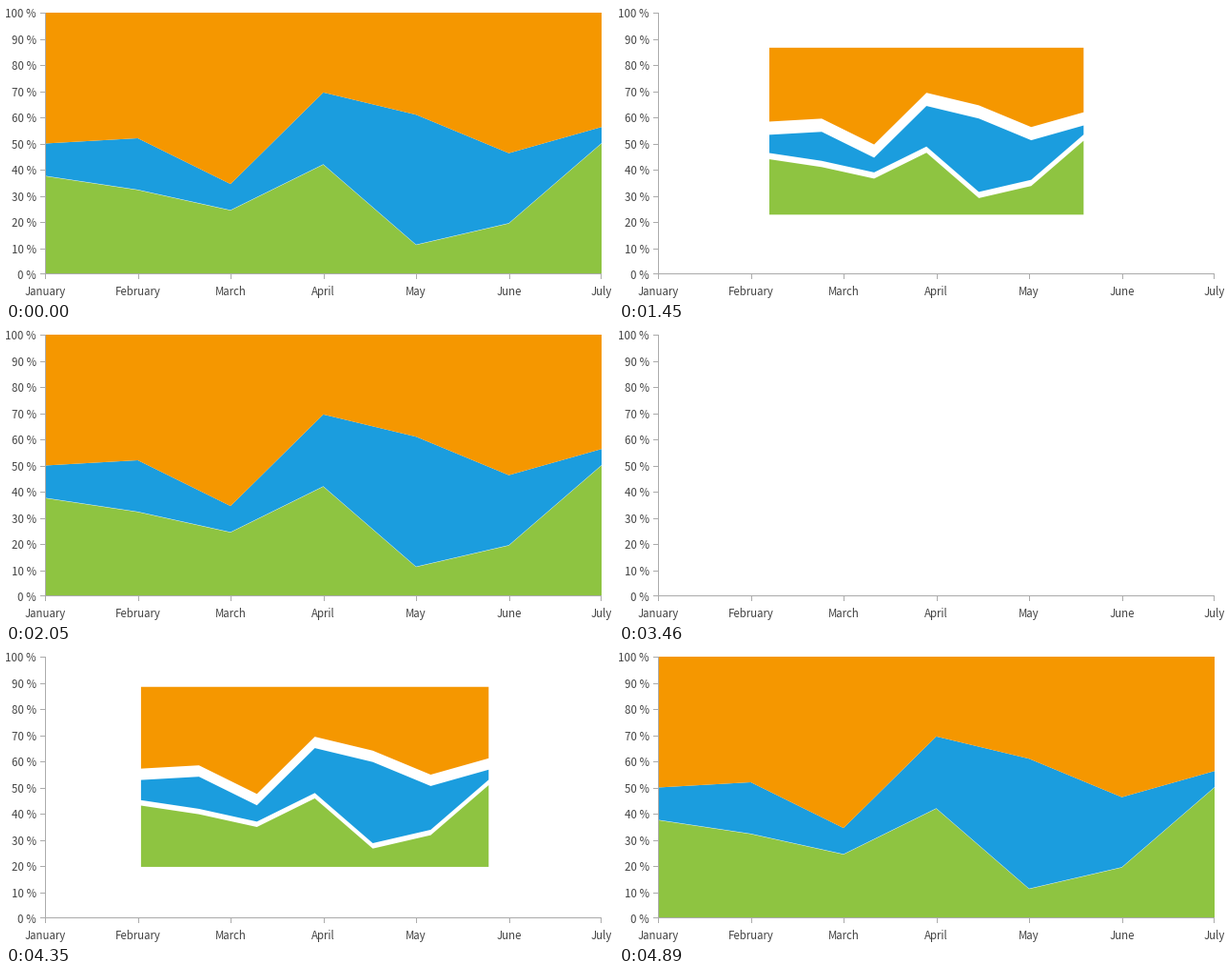
A matplotlib script that plays this animation: 638x309 px, repeating every 5320 ms.

```python
import math

import matplotlib.pyplot as plt
import numpy as np
from matplotlib.animation import FuncAnimation
from matplotlib.collections import LineCollection
from matplotlib.patches import Polygon

WIDTH, HEIGHT, DPI = 638, 309, 100
LOOP_MS, TICK_MS = 5320, 10
LEFT, RIGHT, TOP, BOTTOM = 41, 626, 7, 282
MONTHS = ["January", "February", "March", "April", "May", "June", "July"]

# Upper boundary of each stacked band, in percent
GREEN_TOP = np.array([37.5, 32.2, 24.4, 41.9, 11.2, 19.4, 50])
BLUE_TOP = np.array([50, 52, 34.5, 69.5, 61, 46.3, 56.3])
SEAM = 0.15

ORIGIN_X = 309.8
SCALE_STEP = 0.022
FADE_END = 0.276
# Each run: start, first moving step, initial scale (ms, ms, ratio)
RUNS = [(660, 760, 0.0586), (3460, 3570, 0.0526)]


def pixel(value):
    return math.floor(value + 0.5)


def band(lower, upper):
    xs = np.linspace(LEFT, RIGHT, len(MONTHS))
    percents = np.concatenate([upper, lower[::-1]])
    return np.column_stack([np.concatenate([xs, xs[::-1]]),
                            BOTTOM - 2.75 * percents])


def growth(ms):
    """Scale of the bands at a time; zero while they are hidden."""
    for start, moving, initial in reversed(RUNS):
        if ms >= start:
            if ms < start + 100:
                return 0
            step = max(0, (ms - moving) // 30)
            return min(1, initial + SCALE_STEP * step)
    return 1


fig = plt.figure(figsize=(WIDTH / DPI, HEIGHT / DPI), dpi=DPI, facecolor="white")
ax = fig.add_axes([0, 0, 1, 1])
ax.set(xlim=(0, WIDTH), ylim=(HEIGHT, 0))
ax.axis("off")

# Outline, colour and vertical scaling origin of each series
series = [
    (band(np.zeros(7), GREEN_TOP), "#8ec441", 138),
    (band(GREEN_TOP + SEAM, BLUE_TOP), "#1b9dde", 123.5),
    (band(BLUE_TOP, np.full(7, 100)), "#f59700", 91.6),
]
patches = [ax.add_patch(Polygon(points, facecolor=color, linewidth=0))
           for points, color, _ in series]

label_style = dict(family="Noto Sans CJK JP", size=11.5 * 72 / DPI,
                   color="#444444", va="baseline")
axis_x, axis_y = LEFT + 0.5, BOTTOM - 0.5
lines = [[(axis_x, TOP), (axis_x, BOTTOM)], [(LEFT, axis_y), (RIGHT, axis_y)]]
for i in range(11):
    row = pixel(TOP + 27.5 * i)
    y = min(row, BOTTOM - 1) + 0.5
    lines.append([(36, y), (LEFT, y)])
    ax.text(31.8, row + 5, f"{100 - 10 * i} %", ha="right", **label_style)
for i, month in enumerate(MONTHS):
    center = LEFT + 97.5 * i
    x = min(pixel(center), RIGHT - 1) + 0.5
    lines.append([(x, BOTTOM), (x, 287)])
    ax.text(center, 304, month, ha="center", **label_style)
# Centres lie on half pixels, so unsnapped lines fill exactly one pixel
ax.add_collection(LineCollection(lines, colors="#ababab", linewidths=72 / DPI,
                                 capstyle="butt", snap=False, zorder=3))


def update(frame):
    scale = growth(frame * TICK_MS)
    for patch, (points, _, origin_y) in zip(patches, series):
        origin = np.array([ORIGIN_X, origin_y])
        patch.set_visible(scale > 0)
        patch.set_xy(origin + scale * (points - origin))
        patch.set_alpha(min(1, scale / FADE_END))
    return patches


animation = FuncAnimation(fig, update, frames=LOOP_MS // TICK_MS,
                          interval=TICK_MS, repeat=True, repeat_delay=0)
plt.show()
```
